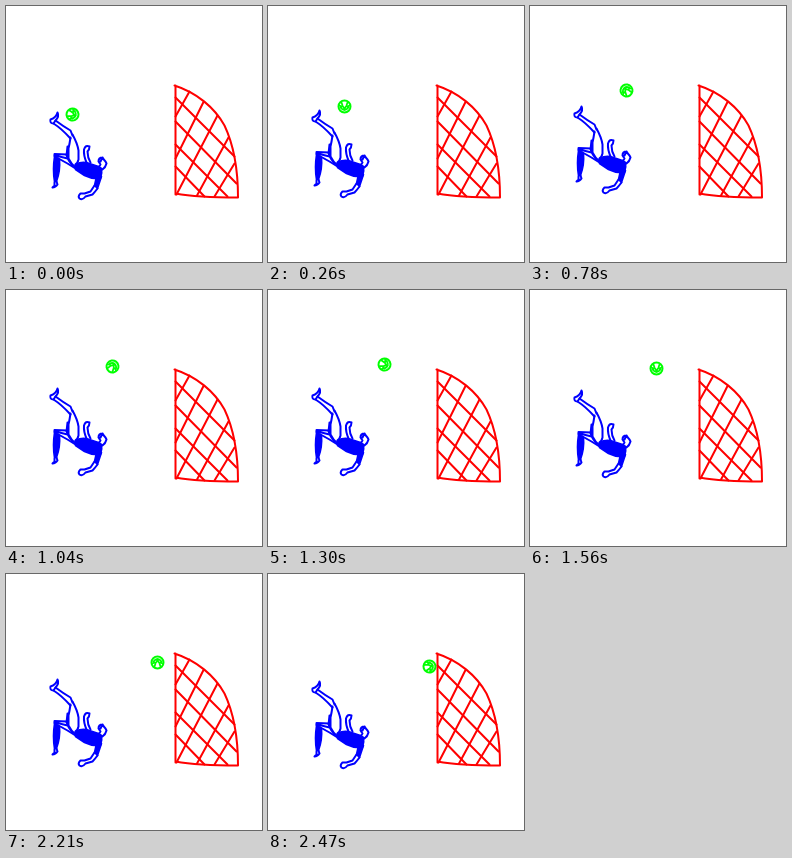
These frames come from a looping animation (256 by 256 pixels, 2600 ms). An HTML page with a canvas:

```html
<!DOCTYPE html>
<html lang="en">
<head>
<meta charset="utf-8">
<title>Overhead kick</title>
<style>
html, body { margin: 0; width: 100%; height: 100%; overflow: hidden; background: #fff; }
canvas { display: block; width: 100vw; height: 100vh; }
</style>
</head>
<body>
<canvas id="stage" width="256" height="256"></canvas>
<script>
const ctx = document.getElementById('stage').getContext('2d');
const STEP = 130, COUNT = 20, PEAK = 9;

const paths = list => list.map(d => new Path2D(d));

const net = paths([
  'M169 79V188M168 79C190 86 208 101 218 119C227 138 231.500 165 231.500 191C210 191 188 190.500 169 187',
  'M169 91L228 150M169 115L230 177M169 138L221 190M169 160L198 190',
  'M183 85L169 110M197 95.500L169 152M211 109L170 188M222 131L190.500 189M228 157L208 190'
]);

const outlines = paths([
  // kicking foot and shin
  'M51 106Q53 110 49 114L47 117Q43 117 44 113Q50 111 51 106Z',
  'M49 114Q57 120 64 124L66 129M47 117Q55 122 64 132',
  // thigh and shorts
  'M66 128Q71 137 72 144L72 153Q71 157 69 158M64 131Q63 138 62 142L62 152Q65 158 69 161M61 140L60 149Q62 155 66 159',
  // trailing thigh
  'M61 148L48 147.500Q47 151 52 152L61 157L69 162M49 149L61 152',
  // raised arm
  'M80 156Q77 149 77.500 143Q79 138 83 140Q83 143 81 145Q81 151 84 156',
  // head
  'M92 155Q92 151 96 151Q97 153 99 155L100 157Q99 161 96 163L93 162M92 155L94 158L92 161M96 151L94 155'
]);

const solids = paths([
  // torso
  'M69 158Q76 154 83 157L92 160L95 162Q96 167 94 172Q86 173 78 169L69 163Z',
  // calf
  'M48 150Q46 163 48 175L50 175Q54 164 53 153Z',
  // upper arm
  'M90 170L88 179L91 182L95 170Z'
]);

const ends = paths([
  // trailing foot
  'M48 176L48 179L46 181Q49 181 51 178L50 175',
  // forearm and hand
  'M91 182Q88 186 86 188L79 190Q76 194 73 192Q71 190 74 187L78 187L84 185L88 179'
]);

const seams = new Path2D('M-3 -4L-2 -1M3 -4L2 -1M-4 1Q0 6 4 1M-1.500 0L0 2L1.500 0M-5 -1L-3 0M5 -1L3 0');

const strokeAll = list => list.forEach(p => ctx.stroke(p));

function style(color) {
  ctx.strokeStyle = ctx.fillStyle = color;
  ctx.lineWidth = 2;
  ctx.lineCap = ctx.lineJoin = 'round';
}

function drawNet() {
  style('#f00');
  strokeAll(net);
}

function drawPlayer(dy) {
  ctx.save();
  ctx.translate(0, dy);
  style('#00f');
  strokeAll(outlines);
  strokeAll(ends);
  ctx.lineWidth = 1.6;
  solids.forEach(p => {
    ctx.fill(p);
    ctx.stroke(p);
  });
  ctx.restore();
}

function drawBall(x, y, angle) {
  ctx.save();
  ctx.translate(x, y);
  ctx.rotate(angle);
  style('#0f0');
  ctx.beginPath();
  ctx.arc(0, 0, 6, 0, Math.PI * 2);
  ctx.stroke();
  ctx.lineWidth = 1.8;
  ctx.stroke(seams);
  ctx.restore();
}

function draw(now) {
  const n = Math.floor(now / STEP) % COUNT;
  const rise = Math.min(n, PEAK), fall = Math.max(n - PEAK, 0);
  ctx.fillStyle = '#fff';
  ctx.fillRect(0, 0, 256, 256);
  ctx.save();
  ctx.translate(0.5, 0.5);
  drawNet();
  drawPlayer(fall - rise);
  drawBall(66 + 5 * n, 108 - 4 * rise + 2 * fall, (n - 2) * Math.PI / 5);
  ctx.restore();
}

const start = performance.now();
function tick() {
  draw(performance.now() - start);
  requestAnimationFrame(tick);
}
tick();
</script>
</body>
</html>
```
